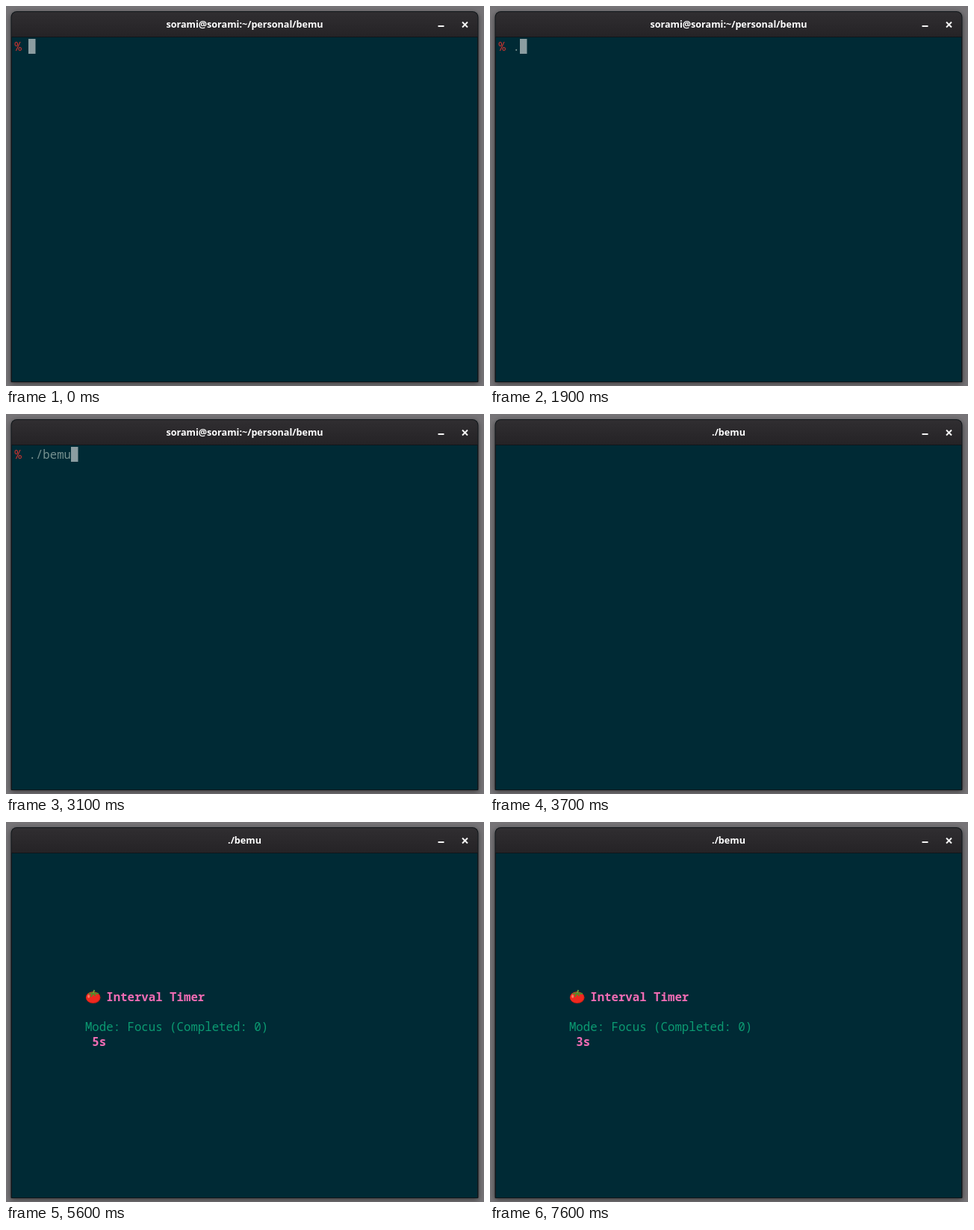
Write an HTML page with a canvas that moves like this. It is 640 px wide and 509 px high and loops after 8000 ms.

```html
<!DOCTYPE html>
<html lang="en">
<head>
<meta charset="utf-8">
<title>Terminal timer</title>
<style>
html, body { margin: 0; width: 100%; height: 100%; overflow: hidden; background: #767477; }
canvas { display: block; }
</style>
</head>
<body>
<canvas id="stage" width="640" height="509"></canvas>
<script>
const ctx = document.getElementById('stage').getContext('2d');
const LOOP = 8000;
const FONT_SIZE = 15.72, CELL_W = 9.432, CELL_H = 20, LEFT = 11.6, TOP = 44;
const PINK = '#f06cb4', KEY = '#69736f', HINT = '#44545a', DOT = '#3a4d53';

// Command line as typed, with one slip corrected on the way.
const typing = [[0, ''], [1000, '.'], [1300, './'], [1900, '.'], [2100, './'],
  [2400, './b'], [2500, './be'], [3100, './bemu']];

const colX = col => LEFT + col * CELL_W;
const rowY = row => TOP + row * CELL_H;

function rect(x, y, w, h, color) {
  ctx.fillStyle = color;
  ctx.fillRect(x, y, w, h);
}

function put(text, col, row, color, weight = 400) {
  ctx.font = `${weight} ${FONT_SIZE}px "Noto Sans Mono", monospace`;
  ctx.textAlign = 'left';
  ctx.fillStyle = color;
  ctx.fillText(text, colX(col), rowY(row) + 16);
}

function ellipse(x, y, rx, ry, color) {
  ctx.fillStyle = color;
  ctx.beginPath();
  ctx.ellipse(x, y, rx, ry, 0, 0, 2 * Math.PI);
  ctx.fill();
}

function stroke(points, color, width) {
  ctx.strokeStyle = color;
  ctx.lineWidth = width;
  ctx.beginPath();
  points.forEach(([x, y]) => ctx.lineTo(x, y));
  ctx.stroke();
}

function tomato(col, row) {
  ctx.save();
  ctx.translate(colX(col) + 10.8, rowY(row) + 10);
  ellipse(0, 1.2, 9.8, 7.9, '#c91d16');
  ellipse(-0.3, 0.8, 9.2, 7.2, '#f0291f');
  ellipse(-6, -0.5, 1.5, 2.2, '#ff7a62');
  for (const [x, y] of [[-6, -4], [-3, 0], [3, -1], [7, -4]])
    stroke([[0, -5], [x, y]], '#4f8f2b', 1.8);
  stroke([[0, -5], [1.5, -9]], '#6fa53a', 1.8);
  ctx.restore();
}

function windowFrame(title) {
  rect(0, 0, 640, 509, '#767477');
  ctx.save();
  ctx.shadowColor = 'rgba(0,0,0,.5)';
  ctx.shadowBlur = 7;
  ctx.shadowOffsetY = 2;
  ctx.fillStyle = '#10161a';
  ctx.beginPath();
  ctx.roundRect(6.5, 7, 626, 497, [8, 8, 1, 1]);
  ctx.fill();
  ctx.restore();

  const bar = ctx.createLinearGradient(0, 8, 0, 41);
  bar.addColorStop(0, '#302e31');
  bar.addColorStop(1, '#252326');
  ctx.fillStyle = bar;
  ctx.beginPath();
  ctx.roundRect(7.5, 8, 624, 33, [7, 7, 0, 0]);
  ctx.fill();
  rect(8, 42, 623, 461, '#002a35');

  ctx.font = '700 12.6px "Noto Sans", sans-serif';
  ctx.textAlign = 'center';
  ctx.fillStyle = '#fff';
  ctx.fillText(title, 319.5, 29);
  rect(578.5, 26, 8, 2, '#f4f4f4');
  stroke([[611, 21.5], [618, 28.5]], '#f4f4f4', 2);
  stroke([[618, 21.5], [611, 28.5]], '#f4f4f4', 2);
}

function prompt(t) {
  const typed = typing.findLast(([start]) => t >= start)[1];
  put('%', 0, 0, '#cf3430');
  put(typed, 2, 0, '#76908f');
  rect(Math.round(colX(2 + typed.length)), TOP, 9.5, CELL_H, '#8c9da1');
}

function menu() {
  rect(125, 124, 189, 20, '#5b5fd5');
  tomato(13, 4);
  put('Welcome to Bemu', 16, 4, '#fbfbdc');
  put('1 item', 12, 6, '#6c787a');
  rect(110, 204, 1, 39, '#a855ae');
  put('Start default', 12, 8, '#e36cea');
  put('25 mins focus and 5 mins break', 12, 9, '#a655ac');

  let col = 12;
  const hints = [['↑/k', 'up'], ['↓/j', 'down'], ['/', 'filter'], ['q', 'quit']];
  hints.forEach(([key, label], i) => {
    put(key, col, 12, KEY);
    col += key.length + 1;
    put(label, col, 12, HINT);
    col += label.length + 1;
    put(i < 3 ? '·' : '…', col, 12, DOT);
    col += 2;
  });
}

function timer(t) {
  tomato(10, 9);
  put('Interval Timer', 13, 9, PINK, 700);
  put('Mode: Focus (Completed: 0)', 10, 11, '#0b9b72');
  put(5 - Math.floor((t - 5600) / 1000) + 's', 11, 12, PINK, 700);
}

function draw(now) {
  const t = now % LOOP;
  windowFrame(t < 3700 ? 'sorami@sorami:~/personal/bemu' : './bemu');
  if (t < 3700) prompt(t);
  else if (t >= 5600) timer(t);
  else if (t >= 3800) menu();
  requestAnimationFrame(draw);
}
requestAnimationFrame(draw);
</script>
</body>
</html>
```
